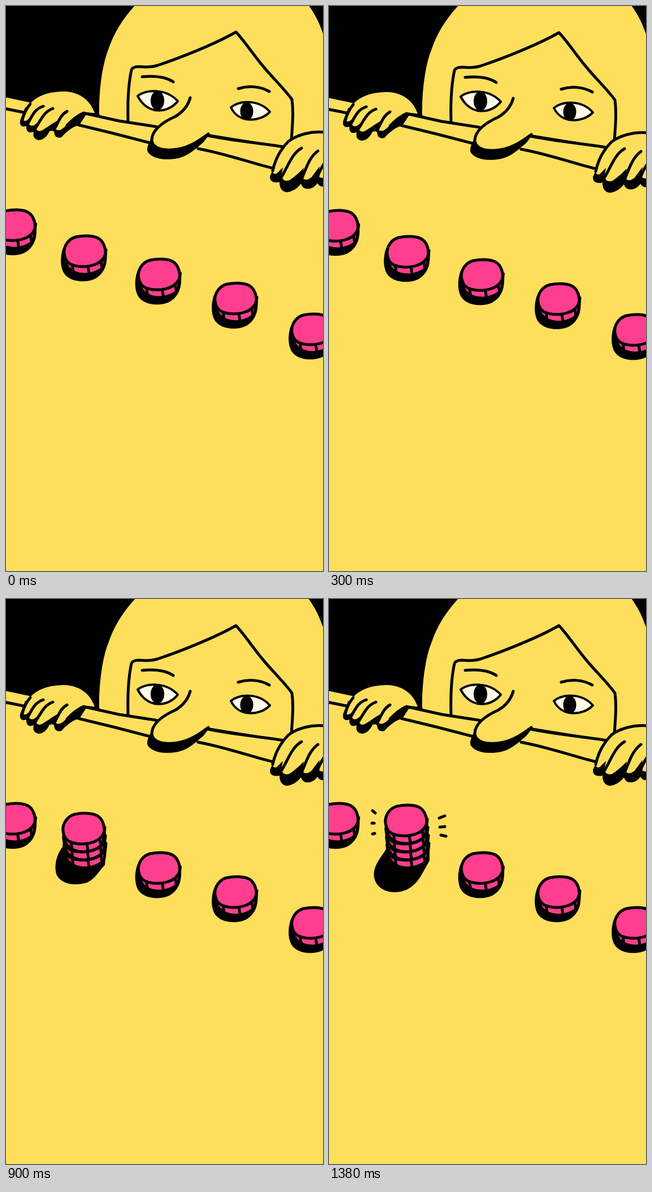
Animation of 561x998 px, one loop 1500 ms. Source, as an HTML page:

```html
<!DOCTYPE html>
<html lang="en">
<head>
<meta charset="utf-8">
<title>Stacking chips</title>
<style>
  html, body { margin: 0; width: 100%; height: 100%; overflow: hidden; background: #000; }
  svg { display: block; width: 100%; height: 100%; }
  .skin { fill: #fedf5c; }
  .line { fill: none; stroke: #000; stroke-width: 5; stroke-linecap: round; stroke-linejoin: round; }
  .white { fill: #fff9e5; stroke: #000; stroke-width: 4; stroke-linejoin: round; }
  .pink { fill: #ff3f8e; stroke: #000; stroke-width: 5; stroke-linejoin: round; }
</style>
</head>
<body>
<svg viewBox="0 0 561 998" preserveAspectRatio="none">
  <defs>
    <g id="chip">
      <path class="pink" d="M103 434L106 456C112 470 126 475 141 475C157 474 171 467 174 458L177 432Z"/>
      <path class="line" stroke-width="4" d="M117 457L119 471M145 460L147 474M168 452L170 464"/>
      <path class="pink" d="M103 439C101 424 112 412 123 409C137 406 153 406 163 411C172 416 176 427 176 437C175 447 166 455 156 458C142 463 125 462 114 457C107 453 104 446 103 439Z"/>
    </g>
    <path id="shade" d="M101 428C95 445 96 465 104 475C116 490 145 490 159 482C172 474 181 460 178 432Z"/>
  </defs>
  <g id="scene">
    <!-- hair and face -->
    <path class="skin" d="M165 196C164 158 169 108 181 78C192 46 208 21 233 -5H532C545 12 555 30 563 56V260Z"/>
    <path class="line" d="M216 206C215 172 217 137 222 114Q224 108 236 108Q255 110 268 106C310 92 370 68 407 47C424 65 438 88 458 111C474 130 493 148 506 166C509 188 507 212 505 238"/>
    <path class="line" stroke-width="6" d="M241 126C262 124 281 125 296 135M411 147C430 141 450 143 466 152"/>
    <path class="white" d="M233 160C247 148 283 146 304 169C288 190 251 195 233 160Z"/>
    <path class="white" d="M398 180C414 167 448 166 467 188C449 207 411 208 398 180Z"/>
    <ellipse cx="268" cy="168" rx="12" ry="17"/>
    <ellipse cx="426" cy="187" rx="11.5" ry="16"/>

    <!-- table and its rim -->
    <path class="skin" d="M-2 162L45 172L137 190L265 214L358 230L492 251L563 262V1010H-2Z"/>
    <path class="line" d="M-3 182L32 189M137 190L200 204L265 214M128 211L190 226L256 243M358 230C400 239 450 243 492 250M340 253C385 261 430 277 474 288"/>

    <!-- nose -->
    <path d="M258 233Q247 252 251 259C260 272 285 274 304 270C323 266 337 252 349 242L360 228L320 230Z"/>
    <path class="skin" d="M326 163C322 178 313 188 300 196C275 207 257 222 258 239C261 255 282 257 303 254C325 251 343 238 358 227Z"/>
    <path class="line" d="M326 163C322 178 313 188 300 196C275 207 257 222 258 239C261 255 282 257 303 254C325 251 343 238 358 227"/>

    <!-- left hand -->
    <path d="M34 180L25 203Q23 217 36 213Q35 228 49 223Q46 236 58 238Q70 237 77 222L85 221Q85 236 98 233C106 224 116 215 130 211L143 191Z"/>
    <path class="skin" d="M44 172C60 156 82 152 105 152C132 154 149 168 157 190L137 189C122 195 111 209 102 216Q93 224 87 218L94 202C82 208 72 216 65 220Q56 225 53 217L60 204L49 212Q41 214 40 207L47 194L37 203Q29 206 30 199Q34 184 44 172Z"/>
    <path class="line" d="M43 174Q33 186 29 202M66 178C54 182 49 188 38 210M83 182C69 187 64 197 51 219M108 187C97 193 94 203 85 220M137 190Q123 196 108 212M137 190L164 195"/>

    <!-- right hand -->
    <path d="M476 282L467 302Q467 315 484 312Q484 328 497 330Q512 328 522 315Q525 325 536 324Q546 322 551 314Q555 321 563 320V270Z"/>
    <path class="skin" d="M563 224C540 222 516 228 500 240C485 255 477 273 473 288Q471 300 479 297L490 286L487 302Q491 312 501 309Q514 301 527 287L524 304Q531 312 541 303L555 284L552 300Q556 306 563 304Z"/>
    <path class="line" d="M563 224C540 222 516 228 500 240C485 255 476 273 472 292M523 252C506 262 501 280 487 304M552 257C537 268 532 285 523 307M564 278Q556 289 551 304"/>

    <!-- chips -->
    <g id="row"></g>
    <path id="shadow"/>
    <g id="stack"></g>
    <path id="sparks" class="line" d="M77 374L82 378M76 396H80M77 415L81 414M195 387L205 383M196 403L205 402M198 417L207 419"/>
  </g>
</svg>
<script>
  const $ = id => document.getElementById(id);
  const STEP = 300, STEPS = 5;
  const use = (id, x, y) => `<use href="#${id}" x="${x}" y="${y}"/>`;

  const spots = [[-124.5, -46], [131.5, 41], [267, 83.5], [403, 138]];
  $('row').innerHTML = spots.map(([x, y]) => use('shade', x, y) + use('chip', x, y)).join('');
  $('stack').innerHTML = [0, 1, 2, 3].map(i => use('chip', -i, -14.3 * i)).join('');

  // shadow for each height of the stack
  const shadows = [
    $('shade').getAttribute('d'),
    'M101 431C91 444 89 470 98 480C109 494 140 496 156 487C169 480 181 464 178 432Z',
    'M102 436C89 449 84 475 90 488C99 505 124 507 143 501C158 495 166 478 175 470L178 432Z',
    'M104 436C98 450 84 462 80 480C76 503 94 518 116 518C139 518 155 504 165 485L178 462V436Z'
  ];

  function draw(now) {
    const step = Math.floor(now / STEP) % STEPS;
    const height = Math.max(0, step - 1);
    $('scene').setAttribute('transform', `translate(0 ${step ? 0 : -1})`);
    $('shadow').setAttribute('d', shadows[height]);
    [...$('stack').children].forEach((chip, i) => chip.style.display = i > height ? 'none' : '');
    $('sparks').style.display = height === 3 ? '' : 'none';
  }

  const start = performance.now();
  function tick() {
    draw(performance.now() - start);
    requestAnimationFrame(tick);
  }
  tick();
</script>
</body>
</html>
```
